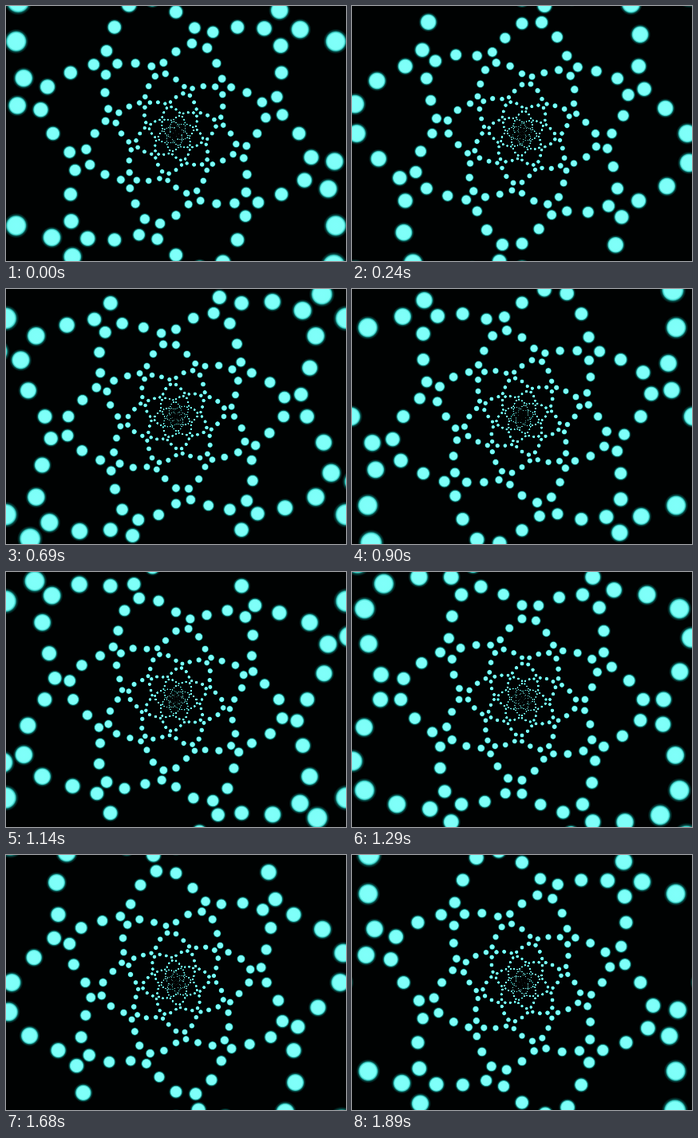
Write an HTML page with a canvas that moves like this. It is 426 by 320 pixels and loops after 1.92 s.

```html
<!DOCTYPE html>
<html lang="en">
<head>
<meta charset="utf-8">
<title>Spiral dots</title>
<style>
html, body { margin: 0; width: 100%; height: 100%; overflow: hidden; background: #000202; }
canvas { display: block; }
</style>
</head>
<body>
<canvas id="stage" width="426" height="320"></canvas>
<script>
const ctx = document.getElementById('stage').getContext('2d');
const LOOP = 1920, STEP = 30;
const CX = 213, CY = 160;
const PERIOD = 2 * Math.log(1.5);   // log distance between turns of a spiral
const SOFT = 0.258;                 // log distance at which two dots start to repel
const MEAN = Math.log(125.2);       // log radius midway between the spirals at the start
const DOT = 0.068;                  // glow radius relative to distance from the centre

const glow = ctx.createRadialGradient(0, 0, 0, 0, 0, 1);
glow.addColorStop(0, '#80fffa');
glow.addColorStop(0.64, '#7dfff8');
glow.addColorStop(0.75, 'rgba(70,240,230,.85)');
glow.addColorStop(0.83, 'rgba(20,190,180,.4)');
glow.addColorStop(1, 'rgba(0,140,130,0)');

function dot(logRadius, angle) {
  const r = Math.exp(logRadius), size = r * DOT;
  ctx.setTransform(size, 0, 0, size, CX + r * Math.cos(angle), CY - r * Math.sin(angle));
  ctx.fillRect(-1, -1, 2, 2);
}

function draw(phase) {
  ctx.setTransform(1, 0, 0, 1, 0, 0);
  ctx.fillStyle = '#000202';
  ctx.fillRect(0, 0, 426, 320);
  ctx.fillStyle = glow;

  for (let i = 0; i < 36; i++) {
    const turn = (i - 6) / 6;
    // Two opposite spirals grow at speeds 1 and 3; gap is their log distance.
    const slow = MEAN + PERIOD * (phase + turn - 0.25);
    let gap = PERIOD * (0.5 + 2 * phase - 2 * turn) + 0.01;
    gap -= PERIOD * Math.round(gap / PERIOD);

    // Dots that meet bounce softly instead of crossing.
    const near = Math.max(0, 1 - (gap / SOFT) ** 2);
    const spread = near ? SOFT / 2 + gap * gap / (2 * SOFT) : Math.abs(gap);
    let mid = slow + gap / 2 - 0.005 - 0.01 * near;
    mid -= PERIOD * Math.floor(mid / PERIOD);

    for (let k = 0; k < 8; k++, mid += PERIOD) {
      dot(mid - spread / 2, i * Math.PI / 18);
      dot(mid + spread / 2, i * Math.PI / 18);
    }
  }
}

function frame() {
  const time = performance.now() % LOOP;
  draw(Math.floor(time / STEP) * STEP / LOOP);
  requestAnimationFrame(frame);
}
frame();
</script>
</body>
</html>
```
